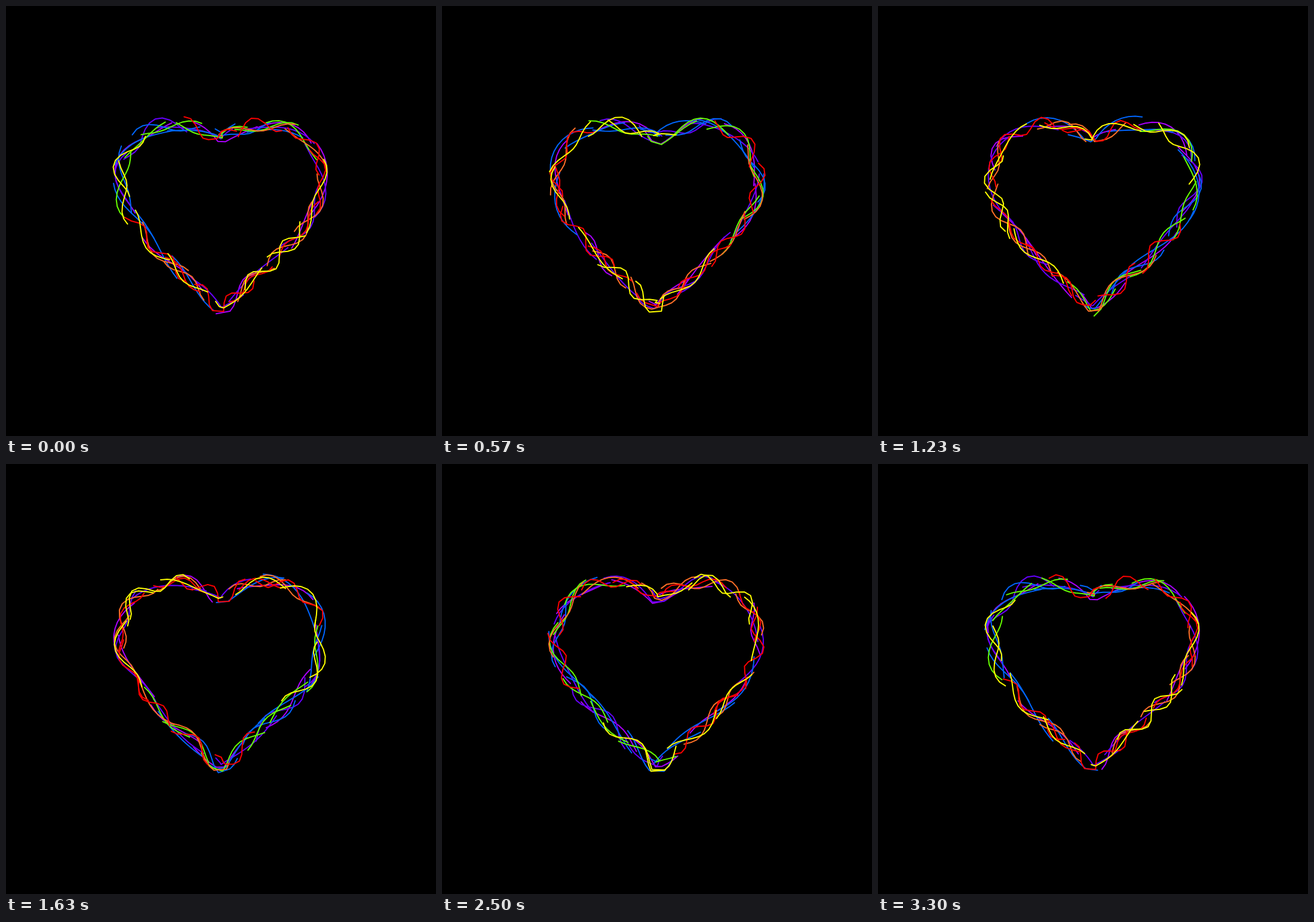
Recreate the animation shown at these times as an HTML page with a canvas. Size 720 by 720 pixels, loop 3330 ms.

```html
<!DOCTYPE html>
<html lang="en">
<head>
<meta charset="utf-8">
<title>Heart ribbons</title>
<style>
  html, body { margin: 0; width: 100%; height: 100%; overflow: hidden; background: #000; }
  canvas { display: block; width: 720px; height: 720px; }
  svg { position: absolute; width: 0; height: 0; }
</style>
</head>
<body>
<canvas id="stage" width="720" height="720"></canvas>
<svg viewBox="0 0 24 24"><path id="heart" d="M12 21.3C5.4 15.3 2 12.3 2 8.5 2 5.4 4.4 3 7.5 3c1.7 0 3.4.7 4.5 1.8 1.1-1.1 2.8-1.8 4.5-1.8C19.6 3 22 5.4 22 8.5c0 3.8-3.4 6.8-10 12.8z"/></svg>
<script>
const LOOP = 3330;
const STEPS = 100;
const SCALE = 17;
const LEFT = 156;
const TOP = 146;
const ctx = document.getElementById('stage').getContext('2d');
const heart = document.getElementById('heart');
const outline = heart.getTotalLength();

// Heads of one colour spread around `middle`, as fractions of a clockwise turn from the tip.
const groups = [
  { color: '#aa00ff', count: 8, middle: 0.6, spread: 0.9, waves: 6 },
  { color: '#6600ff', count: 8, middle: 0.7, spread: 0.9, waves: 6 },
  { color: '#0066ff', count: 9, middle: 0.4, spread: 0.6, waves: 6 },
  { color: '#66ff00', count: 6, middle: 0.51, spread: 0.48, waves: 8 },
  { color: '#ff6f27', count: 7, middle: 0.9, spread: 0.7, waves: 9 },
  { color: '#ff0000', count: 9, middle: 0.88, spread: 0.75, waves: 13 },
  { color: '#ffff00', count: 8, middle: 0.08, spread: 0.65, waves: 10 }
];

let seed = 11;
function random(min, max) {
  seed = seed * 16807 % 2147483647;
  return min + (max - min) * seed / 2147483647;
}

const wrap = (value, size) => ((value % size) + size) % size;
const pointAt = u => heart.getPointAtLength(wrap(u, 1) * outline);

// A point of the outline, pushed outward by `offset`.
function besideOutline(u, offset) {
  const p = pointAt(u);
  const a = pointAt(u - 0.001);
  const b = pointAt(u + 0.001);
  const size = Math.hypot(b.x - a.x, b.y - a.y);
  return [
    LEFT + SCALE * p.x + offset * (b.y - a.y) / size,
    TOP + SCALE * p.y - offset * (b.x - a.x) / size
  ];
}

// A ribbon only slides along its own closed wave, so each wave is sampled once.
function makeRibbon({ color, count, middle, spread, waves }, index) {
  const head = middle + spread * ((index + random(0.2, 0.8)) / count - 0.5);
  const turns = Math.round(waves + random(-3, 3));
  const phase = random(0, 2 * Math.PI);
  const amplitude = random(6, 13);
  const points = Array.from({ length: STEPS }, (_, i) => {
    const u = head + i / STEPS;
    return besideOutline(u, amplitude * Math.sin(2 * Math.PI * turns * u + phase));
  });
  return { color, points, segments: Math.round(random(8, 14)) };
}

const ribbons = groups.flatMap(group =>
  Array.from({ length: group.count }, (_, i) => makeRibbon(group, i)));

function draw(time) {
  const step = Math.floor(wrap(time, LOOP) / LOOP * STEPS + 0.1) % STEPS;
  ctx.fillStyle = '#000';
  ctx.fillRect(0, 0, 720, 720);
  ctx.lineWidth = 2;
  ctx.lineJoin = 'round';
  ctx.lineCap = 'round';
  for (const { color, points, segments } of ribbons) {
    ctx.strokeStyle = color;
    ctx.beginPath();
    for (let k = 0; k <= segments; k++) ctx.lineTo(...points[wrap(step - k, STEPS)]);
    ctx.stroke();
  }
}

const start = performance.now();
function tick() {
  draw(performance.now() - start);
  requestAnimationFrame(tick);
}
tick();
</script>
</body>
</html>
```
